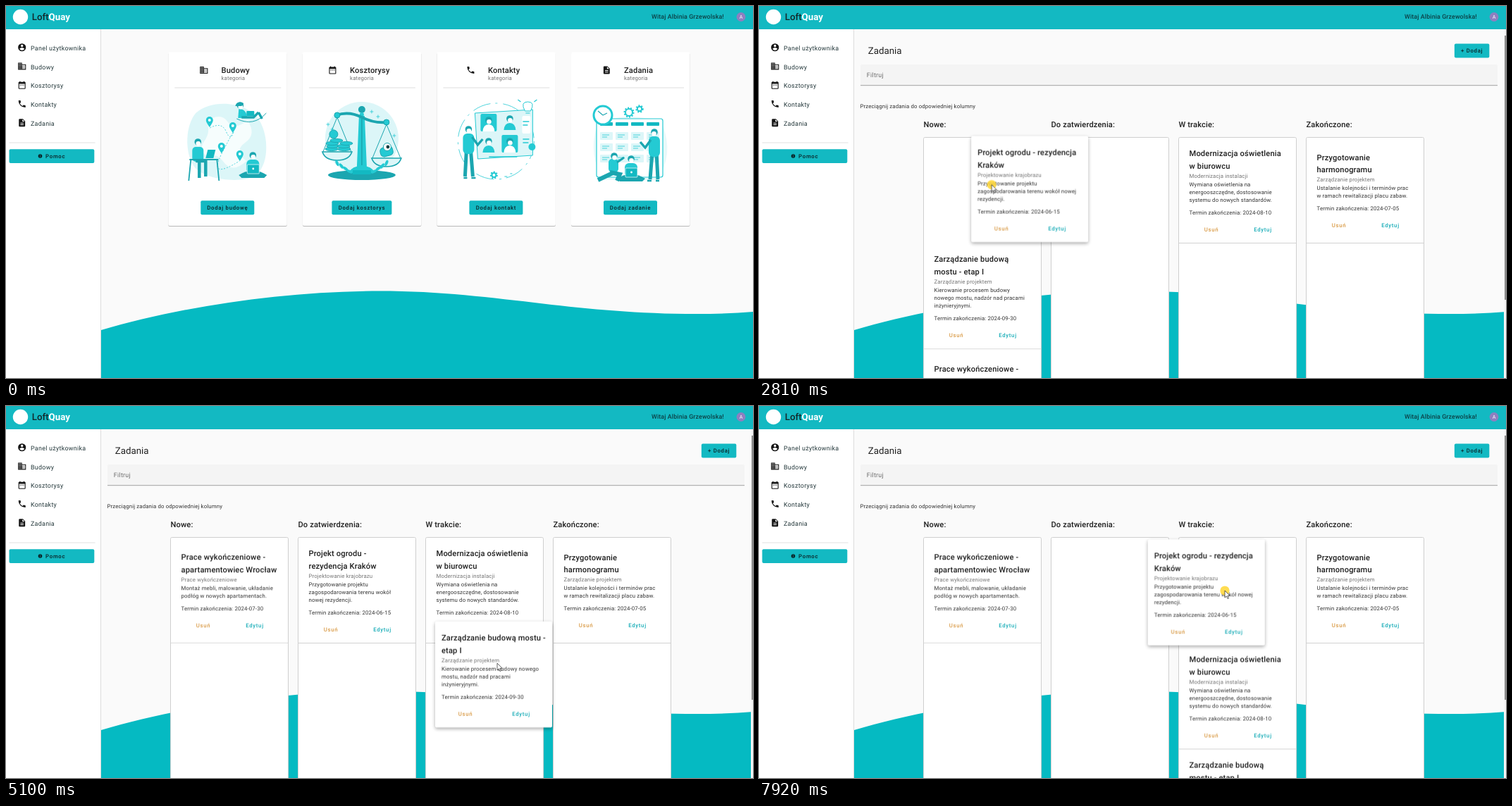
An HTML page for the animation above (8000 ms loop, 1060 px wide and 528 px high).

```html
<!DOCTYPE html>
<html lang="pl">
<head>
<meta charset="utf-8">
<title>Zadania</title>
<style>
html, body { margin: 0; width: 100%; height: 100%; overflow: hidden; background: #fafafa; }
svg { display: block; }
text { font: 400 7.8px Roboto, "Open Sans", sans-serif; letter-spacing: .0179em; fill: #333; white-space: pre; text-rendering: geometricPrecision; }
.title { font-size: 11.14px; font-weight: 500; letter-spacing: .0125em; fill: #1f1f1f; }
.sub { fill: #757575; }
.nav { font-size: 8.91px; letter-spacing: .03125em; fill: #24383b; }
.head { font-size: 13.3px; letter-spacing: 0; fill: #222; }
.brand { font-weight: 500; fill: #12282b; }
.hello { font-size: 8.83px; font-weight: 500; letter-spacing: .012em; fill: #0c4046; text-anchor: end; }
.btn { font-weight: 500; letter-spacing: .0893em; text-anchor: middle; fill: #0b2529; }
.del { fill: #d99a45; }
.edit { fill: #14abb6; }
.tip { font-size: 5.8px; letter-spacing: 0; fill: #eee; }
.raised { filter: drop-shadow(0 1px .7px rgba(0,0,0,.26)); }
.lifted { filter: drop-shadow(0 2.5px 2.5px rgba(0,0,0,.34)); }

.step { animation: 8s step-end infinite; }
#dash { animation-name: dash; }
#board { animation-name: board; }
#cards { animation-name: cards; }
#hover { animation-name: hover; }
#status { animation-name: status; }
#garden { animation-name: garden; }
#bridge { animation-name: bridge; }
#finish { animation-name: finish; }
#light { animation-name: light; }
#gardenDrag { animation: gardenMove 8s cubic-bezier(.4,0,.4,1) infinite, gardenShow 8s step-end infinite; }
#bridgeDrag { animation: bridgeMove 8s cubic-bezier(.4,0,.4,1) infinite, bridgeShow 8s step-end infinite; }
#cursor { animation: cursor 8s cubic-bezier(.4,0,.4,1) infinite; }
#arrow { animation-name: arrow; }
#hand { animation-name: hand; }
#cross { animation-name: cross; }
#click { animation-name: click; }

@keyframes dash { 0% { opacity: 1 } 19.5%, 100% { opacity: 0 } }
@keyframes board { 0% { opacity: 0 } 19.5%, 100% { opacity: 1 } }
@keyframes cards { 0% { opacity: 0 } 21.25%, 100% { opacity: 1 } }
@keyframes hover { 0% { opacity: 0 } 7% { opacity: 1 } 28%, 100% { opacity: 0 } }
@keyframes status { 0% { opacity: 0 } 10.25% { opacity: 1 } 29%, 100% { opacity: 0 } }
@keyframes garden {
  0% { transform: translate(234px,186px); opacity: 1 }
  34% { transform: translate(415px,186px); opacity: 0 }
  44.4% { transform: translate(415px,186px); opacity: 1 }
  94.25%, 100% { transform: translate(415px,186px); opacity: 0 }
}
@keyframes bridge {
  0% { transform: translate(234px,336.4px); opacity: 1 }
  38.125% { transform: translate(234px,186px); opacity: 1 }
  56.5% { transform: translate(596px,336.4px); opacity: 0 }
  66.875% { transform: translate(596px,336.4px); opacity: 1 }
  96.625%, 100% { transform: translate(596px,486.8px); opacity: 1 }
}
@keyframes finish {
  0% { transform: translate(234px,486.8px) }
  38.125% { transform: translate(234px,336.4px) }
  58.125%, 100% { transform: translate(234px,186px) }
}
@keyframes light {
  0% { transform: translate(596px,186px) }
  96.625%, 100% { transform: translate(596px,336.4px) }
}
@keyframes gardenMove {
  0%, 34% { transform: translate(234px,186px) }
  36.125%, 36.875% { transform: translate(330px,184px) }
  39.5%, 41.25% { transform: translate(411.5px,185.5px) }
  44.4%, 94.25% { transform: translate(415px,186px) }
  98.75%, 100% { transform: translate(551.7px,189.3px) }
}
@keyframes gardenShow { 0% { opacity: 0 } 34% { opacity: 1 } 44.4% { opacity: 0 } 94.25%, 100% { opacity: 1 } }
@keyframes bridgeMove {
  0%, 56.5% { transform: translate(234px,186px) }
  61.375%, 63.9% { transform: translate(609px,305.7px) }
  66.875%, 100% { transform: translate(596px,336.4px) }
}
@keyframes bridgeShow { 0% { opacity: 0 } 56.5% { opacity: 1 } 66.875%, 100% { opacity: 0 } }
@keyframes cursor {
  0%, .5% { transform: translate(898px,512px) }
  8%, 26.375% { transform: translate(48px,163px) }
  33.75%, 34% { transform: translate(263px,255px) }
  36.125%, 36.875% { transform: translate(359px,253px) }
  39.5%, 42.5% { transform: translate(440px,254px) }
  46.125%, 56.5% { transform: translate(313px,264px) }
  61.375%, 65% { transform: translate(697px,365px) }
  71.25%, 71.75% { transform: translate(339px,292px) }
  73.5%, 73.875% { transform: translate(439px,288px) }
  80.875%, 83.125% { transform: translate(826px,249px) }
  83.875%, 90.25% { transform: translate(823px,252px) }
  93.5%, 94.25% { transform: translate(524px,258px) }
  98.75%, 100% { transform: translate(661px,262px) }
}
@keyframes arrow {
  0% { opacity: 0 } .5% { opacity: 1 } 7% { opacity: 0 } 28% { opacity: 1 } 32.5% { opacity: 0 }
  34% { opacity: 1 } 43% { opacity: 0 } 56.5% { opacity: 1 } 66.875% { opacity: 0 } 94.25%, 100% { opacity: 1 }
}
@keyframes hand { 0% { opacity: 0 } 7% { opacity: 1 } 28%, 100% { opacity: 0 } }
@keyframes cross {
  0% { opacity: 0 } 32.5% { opacity: 1 } 34% { opacity: 0 } 43% { opacity: 1 }
  56.5% { opacity: 0 } 66.875% { opacity: 1 } 94.25%, 100% { opacity: 0 }
}
@keyframes click {
  0% { opacity: 0 } 18% { opacity: .85 } 20.5% { opacity: 0 } 33.75% { opacity: .85 } 35.5% { opacity: 0 }
  55.9% { opacity: .85 } 58% { opacity: 0 } 93.75% { opacity: .85 } 95.5% { opacity: 0 } 98.5%, 100% { opacity: .85 }
}
</style>
</head>
<body>
<svg id="stage" width="1060" height="528" viewBox="0 0 1060 528"></svg>
<script>
const TEAL = '#13b9c2', MID = '#24cad3', DARK = '#1ba6b0', PALE = '#dcf6f8';

const ICONS = {
  user: 'M12 2a10 10 0 1 0 0 20a10 10 0 1 0 0-20zm0 3a3 3 0 1 1 0 6a3 3 0 1 1 0-6zm0 14.2c-2.5 0-4.7-1.3-6-3.2c0-2 4-3.1 6-3.1s6 1.1 6 3.1c-1.3 1.9-3.5 3.2-6 3.2z',
  site: 'M12 7V3H2v18h20V7zM6 19H4v-2h2zm0-4H4v-2h2zm0-4H4V9h2zm0-4H4V5h2zm4 12H8v-2h2zm0-4H8v-2h2zm0-4H8V9h2zm0-4H8V5h2zm10 12h-8v-2h2v-2h-2v-2h2v-2h-2V9h8zm-2-8h-2v2h2zm0 4h-2v2h2z',
  date: 'M19 4h-1V2h-2v2H8V2H6v2H5a2 2 0 0 0-2 2v14a2 2 0 0 0 2 2h14a2 2 0 0 0 2-2V6a2 2 0 0 0-2-2zm0 16H5V9h14zM9 11H7v2h2zm4 0h-2v2h2zm4 0h-2v2h2z',
  call: 'M6.6 10.8a15 15 0 0 0 6.6 6.6l2.2-2.2a1 1 0 0 1 1-.3a11 11 0 0 0 3.6.6a1 1 0 0 1 1 1V20a1 1 0 0 1-1 1A17 17 0 0 1 3 4a1 1 0 0 1 1-1h3.5a1 1 0 0 1 1 1a11 11 0 0 0 .6 3.6a1 1 0 0 1-.3 1z',
  file: 'M14 2H6a2 2 0 0 0-2 2v16a2 2 0 0 0 2 2h12a2 2 0 0 0 2-2V8zm2 16H8v-2h8zm0-4H8v-2h8zm-3-5V3.5L18.5 9z'
};

const txt = (x, y, s, c = '') => `<text x="${x}" y="${y}" class="${c}">${s}</text>`;
const box = (x, y, w, h, fill, r = 0, more = '') =>
  `<rect x="${x}" y="${y}" width="${w}" height="${h}" rx="${r}" fill="${fill}" ${more}/>`;
const dot = (x, y, r, fill, more = '') => `<circle cx="${x}" cy="${y}" r="${r}" fill="${fill}" ${more}/>`;
const path = (d, fill, more = '') => `<path d="${d}" fill="${fill}" ${more}/>`;
const line = (d, color, w = 1, more = '') => path(d, 'none', `stroke="${color}" stroke-width="${w}" ${more}`);
const at = (x, y, s) => `<g transform="translate(${x} ${y})">${s}</g>`;
const icon = (name, cx, cy) =>
  `<path transform="translate(${cx - 6.68} ${cy - 6.68}) scale(.557)" fill="#151515" fill-rule="evenodd" d="${ICONS[name]}"/>`;
const button = (cx, cy, w, label) =>
  box(cx - w / 2, cy - 10, w, 20, TEAL, 2) + txt(cx, cy + 2.7, label, 'btn');

// Illustration parts
const pin = (x, y) => at(x, y, path('M0 0c-4-6-5-8-5-10a5 5 0 0 1 10 0c0 2-1 4-5 10z', MID) + dot(0, -10, 2, '#fff'));
const gear = (x, y, r) => dot(x, y, r, 'none', `stroke="${MID}" stroke-width="2"`) +
  dot(x, y, r + 1.5, 'none', `stroke="${MID}" stroke-width="2" stroke-dasharray="2 2"`);
const spark = (x, y) => line(`M${x - 2.5} ${y}h5M${x} ${y - 2.5}v5`, MID, .8);
const head = (x, y) => dot(x, y - 1, 4.8, DARK) + dot(x + .5, y + 1.2, 3.3, '#fff');
const sitter = (x, y) => at(x, y, box(-9, 5, 18, 20, MID, 6) +
  path('M-20 27q20-13 40 0l-4 4h-32z', DARK) + box(-8, 12, 17, 13, TEAL, 1, 'stroke="#fff" stroke-width=".7"') +
  dot(.5, 18, 1.4, '#fff') + head(0, 0));
const stander = (x, y, dir) => at(x, y, `<g transform="scale(${dir} 1)">` +
  line('M-3 28L-5 66M3 28L6 66', DARK, 5) + line('M-7 68h5M4 68h6', DARK, 2.5) +
  box(-8, 5, 16, 29, MID, 6) + line('M5 10L13 21L20 13', DARK, 3.4) + head(0, 0) + '</g>');

const mapArt = () =>
  path('M-45-40C-20-62 30-55 45-30S58 35 40 48S-35 55-48 35S-60-22-45-40z', PALE) +
  path('M-30-28q20-14 30 0t28-2q14 20-3 32t2 26q-20 18-32 2t-20-6q-18-10-8-24t3-28z', '#fff', 'opacity=".75"') +
  line('M-25-19Q-8-28-2-14T8-11T-8 17T17 28', MID, .8, 'stroke-dasharray="2 2"') +
  pin(-25.5, -20) + pin(7.5, -12) + pin(-8.5, 17) + pin(17.5, 28) +
  line('M13-32q24 12 42-8', DARK, 1) + path('M16-46q11 0 12 13l-13 0z', MID) +
  line('M20-34h17l7-7M44-41l5 9', DARK, 3.5) + box(27, -43, 11, 7, TEAL, 1) + head(18, -50) +
  path('M11-50q2-8 12-4l-3 4z', DARK) +
  box(-50, 8, 16, 21, MID, 5) + line('M-45 28h14v22M-40 28v24', DARK, 4.5) + head(-42, 2) +
  path('M-28 12h11l-3 12h-11z', TEAL) + line('M-54 26h41M-52 26l-3 30M-15 26l3 30', DARK, 1.8) + sitter(36, 21);

const scaleArt = () => dot(0, -4, 52, PALE) +
  path('M-48 48a48 7 0 1 0 96 0a48 7 0 1 0-96 0z', DARK) +
  path('M-4-36h8l3 72h-14zM-18 44q4-9 18-9t18 9z', MID) + line('M0-32v66', DARK, 1.6) +
  path('M-13 41h26v6h-26z', TEAL) + dot(0, -45, 5, DARK) + dot(0, -38, 3, MID) +
  line('M-36-37Q-18-43 0-34T36-27', DARK, 4) + dot(-35, -37, 4, MID, `stroke="${DARK}"`) + dot(35, -27, 4, MID, `stroke="${DARK}"`) +
  line('M-35-34l-20 49M-35-34l20 49M35-24l-20 48M35-24l20 48', DARK, 1) +
  path('M-56 15h42q-4 12-21 12t-21-12zM14 24h42q-4 12-21 12t-21-12z', PALE, `stroke="${DARK}" stroke-width="1.6"`) +
  [[-49, 11], [-47, 7], [-48, 3], [-31, 11], [-32, 7], [-42, -1], [-28, 3]].map(([x, y]) =>
    `<ellipse cx="${x + 6}" cy="${y}" rx="9" ry="2.6" fill="${MID}" stroke="${DARK}" stroke-width=".9"/>`).join('') +
  dot(-40, -10, 6, MID, `stroke="${DARK}"`) +
  box(26, 8, 18, 13, MID, 5, `stroke="${DARK}" transform="rotate(-14 35 14)"`) + dot(36, 8, 5.5, '#fff', `stroke="${DARK}"`) + dot(37, 8, 2.4, '#173d42') +
  [-1, 1].map(s => [0, 1, 2, 3].map(i =>
    `<ellipse cx="${s * (17 + i * 6)}" cy="${43 - i * 4}" rx="4.4" ry="2" fill="${MID}" transform="rotate(${-s * (25 + i * 14)} ${s * (17 + i * 6)} ${43 - i * 4})"/>`).join('')).join('') +
  spark(-48, -24) + spark(-42, -17) + spark(14, -42) + spark(23, -35) + spark(46, -8);

const tile = (x, y, c) => at(x, y, box(0, 0, 23, 25, c, 2) + path('M3 25q1-10 8.5-10t8.5 10z', c == PALE ? MID : '#fff') + head(11.5, 10));
const callArt = () => dot(0, 0, 54, 'none', `stroke="${MID}" stroke-width=".8" stroke-dasharray="26 7 3 8"`) +
  path('M-30-40L52-45V20L-26 25z', PALE, `stroke="${MID}"`) +
  tile(-22, -39, MID) + tile(8, -41, PALE) + tile(-22, -9, PALE) + tile(8, -9, MID) + box(37, -36, 12, 25, '#fff', 2) +
  line('M38-28h9M38-23h7M38-3h9M38 2h8M-10 22h40', MID, 1.4) +
  path('M41-43q-7-13 4-13t4 13z', '#fff', `stroke="${MID}"`) + line('M42-40h6M35-56l-4-3M54-56l4-3', MID, 1.2) +
  stander(-39, -16, 1) + gear(-3, 48, 3) + dot(51, 8, 5, MID) + line('M12 50h4M20 46h3', MID);

const planArt = () => path('M-48-20Q-10-48 45-25q18 45-8 80h-75q-22-35-10-75z', PALE, 'opacity=".65"') +
  box(-48, -32, 94, 83, '#fff', 3, `stroke="${MID}" stroke-width="1.2"`) +
  [0, 1, 2, 3].map(i => box(-43 + i * 22, -27, 18, 5, TEAL, 1) + [0, 1, 2].map(j =>
    box(-43 + i * 22, -13 + j * 16, 18, 11, PALE, 1) + line(`M${-40 + i * 22} ${-9 + j * 16}h10m-10 3h7`, MID, .8)).join('')).join('') +
  dot(-39, -37, 13, '#fff', `stroke="${MID}" stroke-width="3"`) + line('M-39-37l-7-6M-39-37l6-3', DARK, 1.1) +
  gear(-2, -41, 5) + gear(13, -46, 3.2) +
  box(-31, 25, 14, 19, MID, 5) + line('M-29 44l14 3l-4 9M-25 45l-21 10', DARK, 6) + line('M-19 30L-9 23', DARK, 3) + head(-23, 22) +
  sitter(1, 26) + stander(34, -12, -1);

const dashCard = ([title, name, cx, dx, label, w, art]) => {
  const x = cx - 84;
  return box(x, 65.5, 168.5, 246.5, '#fff', 2, 'class="raised"') + icon(name, x + dx - 24.7, 91) +
    txt(x + dx, 95.2, title, 'title') + txt(x + dx, 105.3, 'kategoria', 'sub') +
    line(`M${x + 9} 116h151`, '#dedede') + at(cx, 192, art()) + button(cx, 286.2, w, label);
};

// Task text; "|" separates lines
const card = (title, sub, body, date, pad = 14.5) => {
  const lines = body.split('|'), top = lines.length < 3 ? 5.5 : 0, end = top + lines.length * 11.1;
  const spread = pad < 10 ? 3 : 0;
  return title.split('|').map((s, i) => txt(pad, 27 + top + i * 17.7, s, 'title')).join('') +
    txt(pad, 57.7 + top, sub, 'sub') +
    lines.map((s, i) => txt(pad, 69.8 + top + i * 11.1, s)).join('') +
    txt(pad, 76.6 + end, 'Termin zakończenia: ' + date) +
    txt(46 - spread, 100.5 + end, 'Usuń', 'btn del') + txt(119 + spread, 100.5 + end, 'Edytuj', 'btn edit');
};
const slot = (id, ...text) => `<g id="${id}" class="step">${card(...text)}${line('M0 150.5h166', '#d2d2d2')}</g>`;
const drag = (id, ...text) => `<g id="${id}">${box(0, 0, 166, 150.4, '#fff', 2, 'class="lifted"')}${card(...text, 9)}</g>`;

const nav = [['Panel użytkownika', 'user'], ['Budowy', 'site'], ['Kosztorysy', 'date'], ['Kontakty', 'call'], ['Zadania', 'file']];
const tiles = [
  ['Budowy', 'site', 314.3, 75.2, 'Dodaj budowę', 76, mapArt],
  ['Kosztorysy', 'date', 504.9, 67.2, 'Dodaj kosztorys', 85, scaleArt],
  ['Kontakty', 'call', 695.4, 72.7, 'Dodaj kontakt', 76, callArt],
  ['Zadania', 'file', 886, 75, 'Dodaj zadanie', 76, planArt]
];
const columns = ['Nowe:', 'Do zatwierdzenia:', 'W trakcie:', 'Zakończone:'];

const backdrop = box(0, 0, 1060, 528, '#fafafa') +
  path('M135 460C245 427 395 404.5 530 404.5C690 404.5 800 437 980 437Q1025 437 1060 434V528H135z', '#05bac2');

const sidebar = box(0, 33, 134.5, 495, '#fff') + line('M134.5 33v495', '#dcdcdc') +
  `<g id="hover" class="step">${box(4.5, 153.5, 121, 27, '#dedede', 2)}</g>` +
  nav.map(([s, name], i) => icon(name, 22.7, 58.7 + i * 26.75) + txt(35, 62.8 + i * 26.75, s, 'nav')).join('') +
  line('M4.5 194h122', '#e0e0e0') + box(4.5, 203.3, 120.8, 19.8, TEAL, 2) +
  dot(48.5, 213, 2.8, '#0b2529') + line('M48.5 212.6v1.8M48.5 211.2v.7', TEAL, .7) + txt(70.2, 215.7, 'Pomoc', 'btn');

const header = box(0, 0, 1060, 33, TEAL) + dot(20.5, 15.5, 10.7, '#fff') +
  '<text x="36.7" y="20.1" class="head brand">Loft<tspan fill="#fff" font-weight="700">Quay</tspan></text>' +
  txt(1018.8, 18.4, 'Witaj Albinia Grzewolska!', 'hello') + dot(1043, 15.5, 6.4, '#8d7fc0') +
  '<text x="1043.1" y="18.1" text-anchor="middle" style="fill:#fff;font-size:7.2px">A</text>';

const board = txt(154.8, 68.1, 'Zadania', 'head') + button(1011.6, 63.4, 49.5, '+ Dodaj') +
  path('M144 113V85q0-2 2-2h900q2 0 2 2v28z', '#f4f4f4') + line('M144 112.7h904', '#8c8c8c', .8) +
  '<text x="152.8" y="101.3" class="nav" style="fill:#6c6c6c">Filtruj</text>' +
  txt(143.5, 144.8, 'Przeciągnij zadania do odpowiedniej kolumny') +
  columns.map((s, i) => txt(233.4 + i * 181, 172, s, 'title') +
    box(233.5 + i * 181, 186.5, 167, 400, '#fff', 2, 'stroke="#cfcfcf"')).join('') +
  box(1057, 33, 3, 495, '#f5f5f5') + box(1058, 42, 2, 375, '#8e8e8e');

const garden = ['Projektowanie krajobrazu', '2024-06-15'], bridge = ['Zarządzanie projektem', '2024-09-30'];
const cards =
  slot('garden', 'Projekt ogrodu -|rezydencja Kraków', garden[0], 'Przygotowanie projektu|zagospodarowania terenu wokół|nowej rezydencji.', garden[1]) +
  slot('bridge', 'Zarządzanie budową|mostu - etap I', bridge[0], 'Kierowanie procesem budowy|nowego mostu, nadzór nad pracami|inżynieryjnymi.', bridge[1]) +
  slot('finish', 'Prace wykończeniowe -|apartamentowiec Wrocław', 'Prace wykończeniowe', 'Montaż mebli, malowanie, układanie|podłóg w nowych apartamentach.', '2024-07-30') +
  slot('light', 'Modernizacja oświetlenia|w biurowcu', 'Modernizacja instalacji', 'Wymiana oświetlenia na|energooszczędne, dostosowanie|systemu do nowych standardów.', '2024-08-10') +
  at(777, 186, slot('plan', 'Przygotowanie|harmonogramu', 'Zarządzanie projektem', 'Ustalanie kolejności i terminów prac|w ramach rewitalizacji placu zabaw.', '2024-07-05')) +
  drag('gardenDrag', 'Projekt ogrodu - rezydencja|Kraków', garden[0], 'Przygotowanie projektu|zagospodarowania terenu wokół nowej|rezydencji.', garden[1]) +
  drag('bridgeDrag', 'Zarządzanie budową mostu -|etap I', bridge[0], 'Kierowanie procesem budowy nowego|mostu, nadzór nad pracami|inżynieryjnymi.', bridge[1]);

const ink = 'stroke="#222" stroke-width=".7" stroke-linejoin="round"';
const arm = 'M-.6-.6v-2.8h-1.6L0-6l2.2 2.6H.6v2.8z';
const pointer = `<g id="click" class="step">${dot(0, 0, 6.6, '#ffd633')}</g>` +
  `<g id="arrow" class="step">${path('M0 0v10l2.4-2.1l1.6 3.6l1.6-.7l-1.6-3.5h3.2z', '#fff', ink)}</g>` +
  `<g id="hand" class="step">${path('M-1 1.2q0-1.2 1-1.2t1 1.2v3.6q4.8 0 5 2v2.6q0 1.6-1 3v.8h-5v-.8q-2.4-2-3.4-4.6q.6-1.4 2.4.4z', '#fff', ink)}</g>` +
  `<g id="cross" class="step">${[0, 90, 180, 270].map(a => path(arm, '#fff', `${ink} transform="rotate(${a})"`)).join('')}${dot(0, 0, .9, '#222')}</g>`;

document.getElementById('stage').innerHTML = backdrop +
  `<g id="dash" class="step">${tiles.map(dashCard).join('')}</g>` +
  `<g id="board" class="step">${board}<g id="cards" class="step">${cards}</g></g>` +
  sidebar + header +
  `<g id="status" class="step">${box(-2, 517, 63.5, 13, '#2a2a2a', 1)}${txt(-1, 524.8, 'evserver:5300/boards', 'tip')}</g>` +
  `<g id="cursor">${pointer}</g>`;
</script>
</body>
</html>
```
